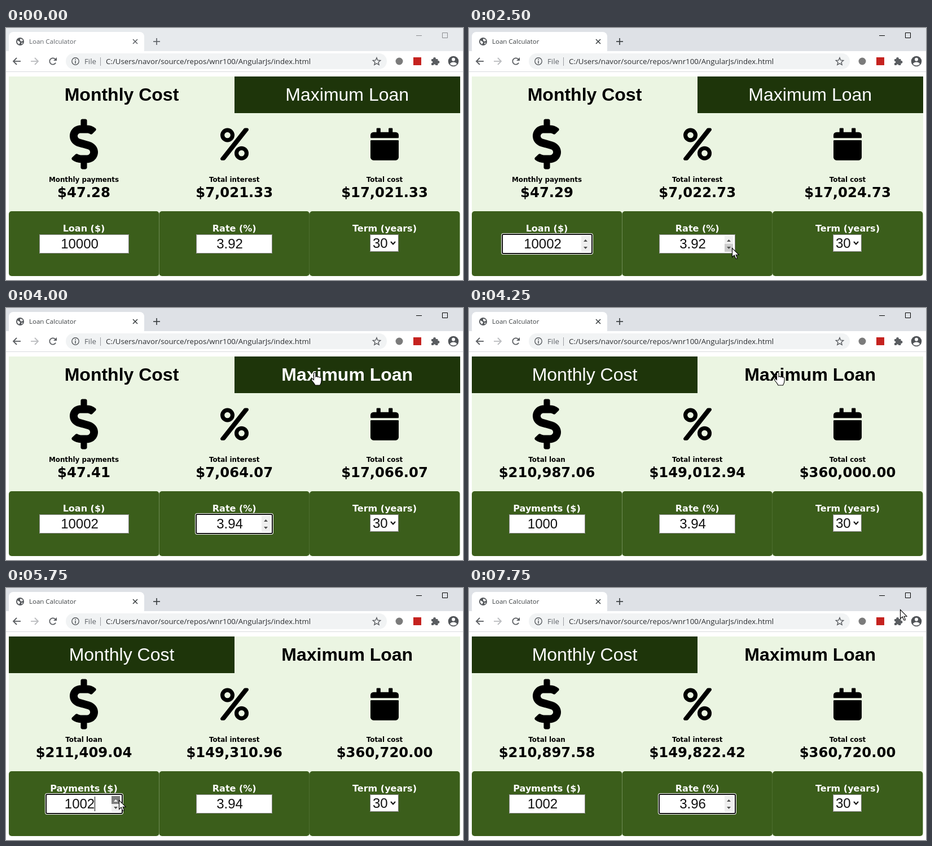
Recreate the animation shown at these times as an HTML page with a canvas. Size 810 px wide and 447 px high, loop 8 s.

```html
<!DOCTYPE html>
<html lang="en">
<head>
<meta charset="utf-8">
<title>Loan Calculator</title>
<style>
  html, body { margin: 0; width: 100%; height: 100%; overflow: hidden; background: #fff; }
  canvas { display: block; }
</style>
</head>
<body>
<canvas id="stage" width="810" height="447"></canvas>
<script>
const ctx = document.getElementById('stage').getContext('2d');
const STEP = 250, LOOP = 8000;
const ARIAL = '"Liberation Sans", Arial, sans-serif';
const WIDE = '"DejaVu Sans", Verdana, sans-serif';
const UI = '"Open Sans", "Segoe UI", sans-serif';
const LIGHT = '#ebf5e2', DARK = '#1e350a', PANEL = '#3b5e1b';
const COLS = [138, 404.7, 671];

// Pointer stops: first step, x, y
const STOPS = [
  [1, 352, 428], [2, 300, 406], [3, 248, 388], [4, 212, 376], [5, 209, 373],
  [9, 340, 388], [10, 466, 390], [11, 463, 377], [14, 472, 338], [15, 518, 205],
  [16, 547, 114], [18, 197, 309], [19, 199, 350], [20, 200, 376],
  [25, 330, 382], [26, 463, 377], [29, 500, 335], [30, 640, 185], [31, 764, 38]
];
const PRESSED = [7, 8, 12, 13, 21, 23, 27, 28];

const DOLLAR = (() => {
  const half = new Path2D('M209 233.4l-108-31.6C88.7 198 80 186.5 80 173.5c0-16.3 13.2-29.5 29.5-29.5' +
    'h66.3c12.2 0 24.2 3.7 34.2 10.5 6 4 14.3 3 19.5-2l34.8-34c7-7 6-18.4-1.8-24.5C238 75 207.4 64 176 64' +
    'V16c0-8.8-7.2-16-16-16h-32c-8.8 0-16 7.2-16 16v48h-2.5C45.8 64-5.4 118.7.5 183.6' +
    'c4.2 46 39.4 83.6 83.8 96.6l40 12z');
  const whole = new Path2D(half);
  whole.addPath(half, new DOMMatrix([-1, 0, 0, -1, 288, 512]));
  return whole;
})();
const SLASH = new Path2D('M392 0h32c19 0 31 22 20 38L77 502q-8 10-20 10H24c-19 0-31-22-19-38L373 10q7-10 19-10z');
const ARROW = new Path2D('M.5 .5V16.5L4.2 13L6.8 19H9.2V17.5L7 12.2H12Z');
const HAND = new Path2D('M-1.5 1.5Q0-1 2 1.5V8Q4 6.5 5.5 8.5Q7.5 7 9 9.2Q11.5 8 12 10.5V15' +
  'Q12 19 9.5 23H1Q-1 19-5 14.5Q-6.5 11.5-3.5 11.5L-1.5 13.5Z');

function box(x, y, w, h, color, r = 0) {
  ctx.fillStyle = color;
  ctx.beginPath();
  ctx.roundRect(x, y, w, h, r);
  ctx.fill();
}

function frame(x, y, w, h, color, lw = 1, r = 0) {
  ctx.strokeStyle = color;
  ctx.lineWidth = lw;
  ctx.beginPath();
  ctx.roundRect(x + lw / 2, y + lw / 2, w - lw, h - lw, r);
  ctx.stroke();
}

function disc(x, y, r, color) {
  ctx.fillStyle = color;
  ctx.beginPath();
  ctx.arc(x, y, r, 0, 7);
  ctx.fill();
}

function ring(x, y, r, color, lw, from = 0, to = 2 * Math.PI) {
  ctx.strokeStyle = color;
  ctx.lineWidth = lw;
  ctx.beginPath();
  ctx.arc(x, y, r, from, to);
  ctx.stroke();
}

function line(color, lw, ...pts) {
  ctx.strokeStyle = color;
  ctx.lineWidth = lw;
  ctx.beginPath();
  for (let i = 0; i < pts.length; i += 2) ctx.lineTo(pts[i], pts[i + 1]);
  ctx.stroke();
}

function text(str, x, y, font, color, align = 'center') {
  ctx.font = font;
  ctx.fillStyle = color;
  ctx.textAlign = align;
  ctx.fillText(str, x, y);
}

function at(x, y, scale, draw) {
  ctx.save();
  ctx.translate(x, y);
  ctx.scale(scale, scale);
  draw();
  ctx.restore();
}

const money = v => '$' + v.toLocaleString('en-US', { minimumFractionDigits: 2, maximumFractionDigits: 2 });

function stateAt(step) {
  const count = (...steps) => steps.filter(s => step >= s).length;
  const stop = STOPS.filter(s => step >= s[0]).pop();
  let focus = '';
  if (step >= 7) focus = 'loan';
  if (step >= 12) focus = 'rate';
  if (step >= 17) focus = '';
  if (step >= 21) focus = 'loan';
  if (step >= 27) focus = 'rate';
  return {
    focus,
    active: step >= 7,
    maxTab: step >= 17,
    hand: step === 16 || step === 17,
    pressed: PRESSED.includes(step),
    caret: step === 23,
    pointer: stop && { x: stop[1], y: stop[2] },
    loan: 10000 + count(7, 8),
    payment: 1000 + count(21, 23),
    rate: 3.92 + count(12, 13, 27, 28) / 100
  };
}

function drawToolbar() {
  const ink = '#5a5d61';
  box(0, 41, 810, 36, '#fff');
  box(0, 77, 810, 1, '#d9dbde');
  line(ink, 1.8, 26, 59, 13, 59);
  line(ink, 1.8, 19, 53, 13, 59, 19, 65);
  line('#babcbf', 1.8, 44, 59, 57, 59);
  line('#babcbf', 1.8, 51, 53, 57, 59, 51, 65);
  ring(83, 59, 5.7, ink, 1.8, 0.5, 5.5);
  ctx.fillStyle = ink;
  ctx.fill(new Path2D('M90 52V58H84Z'));

  box(106, 45, 569, 28, '#f1f3f4', 14);
  ring(123, 59, 6.2, ink, 1.4);
  box(122.2, 58, 1.6, 5, ink);
  box(122.2, 55, 1.6, 1.7, ink);
  text('File', 139, 64, '13.25px ' + UI, '#5f6368', 'left');
  box(167, 52, 1, 15, '#9a9da1');
  text('C:/Users/navor/source/repos/wnr100/AngularJs/index.html', 177, 64, '13.25px ' + UI, '#2c2e31', 'left');

  ctx.beginPath();
  for (let i = 0; i < 10; i++) {
    const r = i % 2 ? 3.1 : 7, a = i * Math.PI / 5 - Math.PI / 2;
    ctx.lineTo(657 + r * Math.cos(a), 59.7 + r * Math.sin(a));
  }
  ctx.closePath();
  ctx.strokeStyle = ink;
  ctx.lineWidth = 1.4;
  ctx.stroke();

  disc(697, 59, 6.5, '#7b7b7b');
  box(722, 52, 14, 14, '#c5221f');

  box(754, 55, 11.5, 11, ink, 1);
  disc(759.5, 54.5, 2.4, ink);
  disc(766, 60.5, 2.4, ink);
  disc(754.5, 60.5, 1.8, '#fff');
  disc(759.5, 66, 1.8, '#fff');

  disc(793, 59, 9.3, '#505357');
  disc(793, 55.8, 3, '#fff');
  ctx.beginPath();
  ctx.ellipse(793, 63.5, 5.8, 3, 0, 0, 7);
  ctx.fill();
}

function drawBrowser(active) {
  const ink = active ? '#3c4043' : '#5f6368';
  const button = active ? '#000' : '#8b8d90';
  box(0, 0, 810, 41, active ? '#dee1e6' : '#e7eaed');
  box(5, 7, 240, 40, '#fff', 8);
  disc(25, 24, 7, '#54575b');
  ctx.fillStyle = '#fff';
  ctx.fill(new Path2D('M20 22L24 24L25 26L23 29L20 26ZM25 19L29 20L30 23L27 24L25 22ZM27 26H30L28 29Z'));
  text('Loan Calculator', 41, 28, '11.5px ' + UI, ink, 'left');
  line(ink, 1.6, 225, 20, 233, 28);
  line(ink, 1.6, 233, 20, 225, 28);
  line(ink, 1.7, 261, 24, 273, 24);
  line(ink, 1.7, 267, 18, 267, 30);
  box(727, 13, 10, 1, button);
  frame(773, 8, 10, 10, button);
  drawToolbar();
}

function drawTab(label, x, cx, on, hover) {
  if (!on) box(x, 86, 400, 65, DARK);
  text(label, cx, 129, (on || hover ? 'bold ' : '') + '32px ' + ARIAL, on ? '#000' : '#fff');
}

function drawIcons() {
  at(113, 161.5, 50 / 288, () => {
    ctx.fillStyle = '#000';
    ctx.fill(DOLLAR);
  });
  at(380, 177.5, 50 / 448, () => {
    ctx.fillStyle = '#000';
    ctx.fill(SLASH);
    ring(112, 112, 80, '#000', 64);
    ring(336, 400, 80, '#000', 64);
  });
  at(646, 177.5, 50 / 448, () => {
    box(0, 192, 448, 320, '#000', [12, 12, 48, 48]);
    box(0, 64, 448, 96, '#000', [48, 48, 12, 12]);
    box(96, 0, 64, 80, '#000', 12);
    box(288, 0, 64, 80, '#000', 12);
  });
}

function drawSpinner(x, over, pointer, pressed) {
  box(x, 369, 15, 28, '#efefef');
  const onArrows = over && pointer.x >= x && pointer.x < x + 15;
  const upper = onArrows && pointer.y < 383;
  if (onArrows) box(x, upper ? 369 : 383, 15, 14, pressed ? '#7d7d7d' : '#cdcdcd');
  ctx.fillStyle = upper && pressed ? '#fff' : '#505050';
  ctx.fill(new Path2D(`M${x + 4} 379h7l-3.5-4z`));
  ctx.fillStyle = '#505050';
  ctx.fill(new Path2D(`M${x + 4} 388h7l-3.5 4z`));
}

function drawInput(x, w, value, focused, s) {
  const p = s.pointer;
  const over = p && p.x >= x && p.x <= x + w && p.y >= 366 && p.y <= 400;
  if (focused) {
    box(x - 2, 364, w + 4, 38, '#fff', 4);
    box(x - 1, 365, w + 2, 36, '#101010', 3);
    box(x + 1, 367, w - 2, 32, '#fff', 1);
  } else {
    box(x, 366, w, 34, '#fff');
    frame(x, 366, w, 34, '#858585');
  }
  const mid = x + (w - 17) / 2 + 0.5;
  text(value, mid, 391, '24px ' + ARIAL, '#111');
  if (focused && s.caret) box(Math.round(mid + ctx.measureText(value).width / 2), 370, 1, 26, '#000');
  // The hot spot sits near the right edge of the arrows
  if (focused || over) drawSpinner(x + w - 19, over, over && { x: Math.min(p.x, x + w - 5), y: p.y }, s.pressed);
}

function drawForm(s) {
  const labels = [s.maxTab ? 'Payments ($)' : 'Loan ($)', 'Rate (%)', 'Term (years)'];
  labels.forEach((label, i) => {
    box(5 + i * 266.5, 325, 266.4, 115, PANEL, 5);
    text(label, COLS[i], 361, 'bold 16px ' + WIDE, '#fff');
  });
  if (s.maxTab) drawInput(71, 135, String(s.payment), s.focus === 'loan', s);
  else drawInput(59, 159, String(s.loan), s.focus === 'loan', s);
  drawInput(337, 135, s.rate.toFixed(2), s.focus === 'rate', s);

  box(645, 366, 51, 31, '#fff');
  frame(645, 366, 51, 31, '#767676');
  text('30', 650, 390, '24px ' + ARIAL, '#111', 'left');
  line('#111', 2, 682, 379, 686, 383.5, 690, 379);
}

function drawResults(s) {
  const months = 360, r = s.rate / 1200;
  const factor = (1 - (1 + r) ** -months) / r;
  const loan = s.maxTab ? s.payment * factor : s.loan;
  const payment = s.maxTab ? s.payment : s.loan / factor;
  const cost = payment * months;
  const rows = [
    s.maxTab ? ['Total loan', loan] : ['Monthly payments', payment],
    ['Total interest', cost - loan],
    ['Total cost', cost]
  ];
  rows.forEach(([label, value], i) => {
    text(label, COLS[i], 272.5, 'bold 11.9px ' + WIDE, '#000');
    text(money(value), COLS[i], 300, 'bold 24.3px ' + WIDE, '#000');
  });
}

function drawPointer({ pointer, hand }) {
  if (!pointer) return;
  at(pointer.x, pointer.y, 1, () => {
    const shape = hand ? HAND : ARROW;
    ctx.fillStyle = '#fff';
    ctx.strokeStyle = '#000';
    ctx.lineWidth = 1.1;
    ctx.fill(shape);
    ctx.stroke(shape);
  });
}

function draw(step) {
  const s = stateAt(step);
  box(0, 0, 810, 447, '#fff');
  drawBrowser(s.active);
  box(5, 86, 800, 354, LIGHT);
  drawTab('Monthly Cost', 5, 205, !s.maxTab, false);
  drawTab('Maximum Loan', 405, 604.7, s.maxTab, s.hand);
  drawIcons();
  drawResults(s);
  drawForm(s);
  drawPointer(s);
}

function tick() {
  draw(Math.floor(performance.now() % LOOP / STEP));
  requestAnimationFrame(tick);
}
tick();
</script>
</body>
</html>
```
